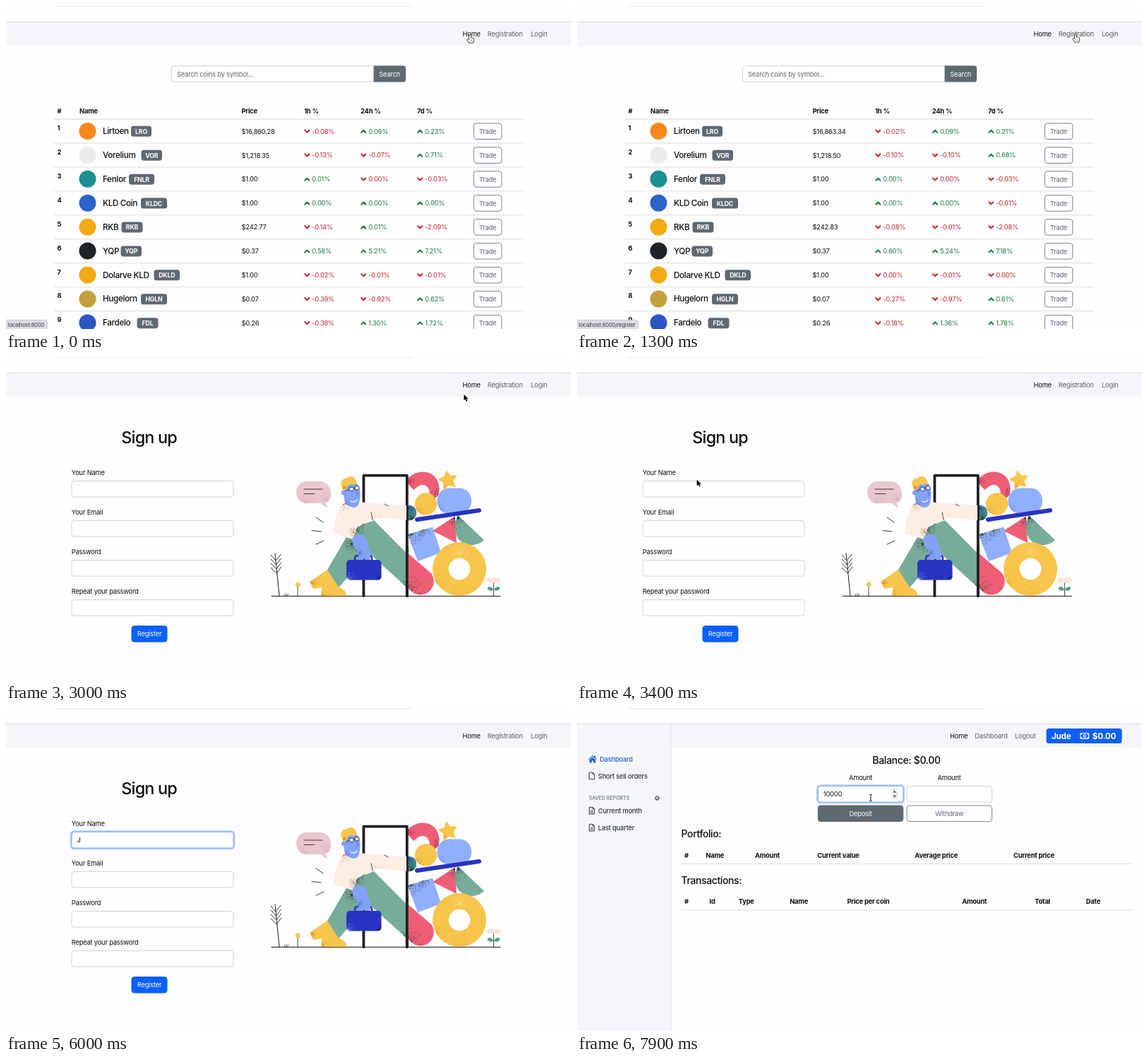
Recreate the animation shown at these times as an HTML page with a canvas. Size 800 by 457 pixels, loop 8 s.

```html
<!DOCTYPE html>
<html lang="en">
<head>
<meta charset="utf-8">
<title>Coin trading demo</title>
<style>
html, body { margin: 0; width: 100%; height: 100%; overflow: hidden; background: #fefdff; }
canvas { display: block; width: 800px; height: 457px; }
</style>
</head>
<body>
<canvas id="stage"></canvas>
<script>
const W = 800, H = 457, LOOP = 8000, STEP = 100;
const REM = 9.66;
const PAGE = '#fefdff', PANEL = '#f4f6f9', LINE = '#dcdfe3', EDGE = '#cfd3d9';
const INK = '#0e0f12', SLATE = '#606970', MUTED = '#5e6064', BLUE = '#0b5ffb';
const RED = '#c5222c', GREEN = '#177c42';

const dpr = window.devicePixelRatio || 1;
function prepare(canvas) {
  canvas.width = W * dpr;
  canvas.height = H * dpr;
  const c = canvas.getContext('2d');
  c.scale(dpr, dpr);
  return c;
}
const stage = document.getElementById('stage');
const g = prepare(stage);

// ---------- helpers ----------
function text(s, x, y, o = {}) {
  const size = (o.size || REM) * 0.97;
  g.font = `${o.weight || 400} ${size}px Inter, "Liberation Sans", sans-serif`;
  g.letterSpacing = `${size * (o.track ?? -0.023)}px`;
  g.textAlign = o.align || 'left';
  g.fillStyle = o.color || INK;
  g.fillText(s, x, y);
}
const bold = (s, x, y, o) => text(s, x, y, { weight: 700, ...o });
const mid = (s, x, y, o) => text(s, x, y, { align: 'center', ...o });

function rect(x, y, w, h, color) {
  g.fillStyle = color;
  g.fillRect(x, y, w, h);
}
function box(x, y, w, h, r, fill, stroke, lw = 1) {
  g.beginPath();
  g.roundRect(x, y, w, h, r);
  if (fill) { g.fillStyle = fill; g.fill(); }
  if (stroke) { g.strokeStyle = stroke; g.lineWidth = lw; g.stroke(); }
}
function disc(x, y, r, color) {
  g.beginPath();
  g.arc(x, y, r, 0, 7);
  g.fillStyle = color;
  g.fill();
}
function line(points, color, lw) {
  g.beginPath();
  points.forEach(([x, y], i) => i ? g.lineTo(x, y) : g.moveTo(x, y));
  g.strokeStyle = color;
  g.lineWidth = lw;
  g.stroke();
}
function field(x, y, w, focus) {
  if (focus) box(x - 2.3, y - 2.3, w + 4.6, 27.1, 5.5, '#b0cafd');
  box(x, y, w, 22.5, 3.6, '#fff', focus ? '#86aff8' : EDGE);
}
function button(label, x, y, w, fill, color) {
  box(x, y, w, 22.5, 3.6, fill, fill || '#7c848b');
  mid(label, x + w / 2, y + 14.9, { color });
}

// ---------- home page ----------
// name, ticker, logo colour, badge x, badge width, prices, changes (^ up, v down)
const COINS = [
  ['Lirtoen', 'LRO', '#f7891c', 177, 29, '16,860.28|16,863.34', 'v-0.08 ^0.09 ^0.23|v-0.02 ^0.09 ^0.21'],
  ['Vorelium', 'VOR', '#ebebee', 191.5, 29.5, '1,218.35|1,218.50', 'v-0.13 v-0.07 ^0.71|v-0.10 v-0.10 ^0.68'],
  ['Fenlor', 'FNLR', '#1b8f91', 174, 36, '1.00|1.00', '^0.01 v0.00 v-0.03|^0.00 v0.00 v-0.03'],
  ['KLD Coin', 'KLDC', '#2a63c9', 191, 37, '1.00|1.00', '^0.00 ^0.00 ^0.00|^0.00 ^0.00 v-0.01'],
  ['RKB', 'RKB', '#f2ab12', 163.5, 30, '242.77|242.83', 'v-0.14 ^0.01 v-2.09|v-0.08 v-0.01 v-2.08'],
  ['YQP', 'YQP', '#1f2226', 162.5, 29.5, '0.37|0.37', '^0.58 ^5.21 ^7.21|^0.60 ^5.24 ^7.18'],
  ['Dolarve KLD', 'DKLD', '#f2ab12', 209.5, 36.5, '1.00|1.00', 'v-0.02 v-0.01 v-0.01|v0.00 v-0.01 v0.00'],
  ['Hugelorn', 'HGLN', '#c3a03c', 191, 37, '0.07|0.07', 'v-0.39 v-0.92 ^0.62|v-0.27 v-0.97 ^0.61'],
  ['Fardelo', 'FDL', '#2d55c2', 185.5, 30, '0.26|0.26', 'v-0.38 ^1.30 ^1.72|v-0.18 ^1.36 ^1.78']
];

function change(code, x, y) {
  const up = code[0] === '^', color = up ? GREEN : RED, d = up ? -1 : 1;
  g.lineCap = g.lineJoin = 'round';
  line([[x + 1.2, y - 1.7 * d], [x + 4.3, y + 1.5 * d], [x + 7.4, y - 1.7 * d]], color, 2);
  g.lineCap = 'butt';
  g.lineJoin = 'miter';
  text(code.slice(1) + '%', x + 11.2, y + 3.2, { color });
}

function home(t) {
  const live = t >= 500 ? 1 : 0;
  const cols = [422, 502 + live * 0.7, 582];

  box(234.3, 84.8, 331.4, 22.4, 3.6, '#fff', EDGE);
  box(520.5, 84.5, 45.5, 23, [0, 3.6, 3.6, 0], SLATE);
  text('Search coins by symbol...', 242, 99.6, { color: '#5f666d' });
  mid('Search', 543.2, 99.6, { color: '#fff' });

  bold('#', 72.5, 151.5);
  bold('Name', 104, 151.5);
  bold('Price', 333.5, 151.5);
  ['1h %', '24h %', '7d %'].forEach((s, i) => bold(s, cols[i], 151.5));
  rect(68, 159.6, 664, 1, '#d5d8dc');

  COINS.forEach(([name, sym, color, bx, bw, price, moves], i) => {
    const y = 177 + 33.92 * i;
    bold(i + 1, 72.5, y - 1);
    disc(115.5, y, 12, color);
    text(name, 137, y + 4, { size: 12.08, weight: 500, track: -0.03 });
    box(bx, y - 7.2, bw, 15, 3.6, SLATE);
    mid(sym, bx + bw / 2, y + 3.8, { size: 9.06, weight: 700, color: '#fff' });
    text('$' + price.split('|')[live], 333.5, y + 3.6);
    moves.split('|')[live].split(' ').forEach((m, k) => change(m, cols[k], y + 0.3));
    button('Trade', 662.3, y - 11, 39.5, null, SLATE);
    rect(68, y + 16.5, 664, 1, LINE);
  });
}

function status(s, w) {
  box(-2, 444.3, w + 2, 16, [0, 3, 0, 0], '#dcdde1', '#c3c5c9', 0.8);
  text(s, 2.8, 453.8, { size: 7.85, color: '#3a3c40' });
}

// ---------- illustration ----------
let seed = 7;
function rnd() {
  seed = (seed * 16807) % 2147483647;
  return seed / 2147483647;
}
function makeArt() {
  const layer = document.createElement('canvas');
  const c = prepare(layer);
  const CREAM = '#fceee2', TEAL = '#77ac99', PINK = '#ee5f76', SKY = '#90b0fd', SKIN = '#82a2fa';
  const SUN = '#f8c54c', NAVY = '#2833c0', SOOT = '#1f2024';
  c.lineJoin = c.lineCap = 'round';

  // Fill a path and optionally spray fine speckles that thin out with distance.
  function shape(d, color, ...sprays) {
    const p = d instanceof Path2D ? d : new Path2D(d);
    c.fillStyle = color;
    c.fill(p);
    c.save();
    c.clip(p);
    for (const [x, y, r, ink = SOOT] of sprays) {
      c.fillStyle = ink;
      for (let i = 0; i < r * 18; i++) {
        const a = rnd() * 6.283, q = r * Math.pow(rnd(), 1.2);
        c.fillRect(x + q * Math.cos(a), y + q * Math.sin(a), 0.55, 0.55);
      }
    }
    c.restore();
  }
  function pen(d, color = SOOT, w = 1) {
    c.strokeStyle = color;
    c.lineWidth = w;
    c.stroke(new Path2D(d));
  }
  function ball(x, y, r) {
    const p = new Path2D();
    p.arc(x, y, r, 0, 7);
    return p;
  }
  function pill(x, y, w, h, r) {
    const p = new Path2D();
    p.roundRect(x, y, w, h, r);
    return p;
  }

  pen('M376 338.3H700', '#3b3b40', 1.2);

  // plants
  pen('M387 338L381 278');
  for (let i = 0; i < 4; i++) {
    const y = 280 + 6 * i;
    pen(`M375 ${y}L${381.8 + i * 0.5} ${y + 8}L389.5 ${y - 1}`, SOOT, 0.9);
  }
  pen('M394 335L395 338M397 334V338M400 335L398 338', SOOT, 0.7);
  pen('M413 323V338', SOOT, 0.8);
  shape(ball(413.3, 322, 3.4), SUN);
  pen('M690.5 319V338', SOOT, 0.8);
  shape(pill(680.5, 312.5, 20, 7, 3.5), '#f9e4d8');
  shape('M690 329C687 324 683 324 681.5 327C684 332 688 331 690 329Z', '#4f9a86');
  shape('M691 329C694 324 698 324 699.5 327C697 332 693 331 691 329Z', '#4f9a86');

  // speech bubble and motion marks
  shape('M426 176H444C464 176 464 206 452 206L455 213C451 212 448 209 446 207H426C406 207 406 176 426 176Z', '#e9c7cf', [424, 207, 14, '#cfa5af'], [453, 200, 10, '#d7adb7']);
  pen('M422 187H448M422 193.5H437', '#4d3238', 1.1);
  pen('M439 227L449 234M433 245.5L446 247M439 265L450 260', SOOT, 0.9);

  // stacked shapes
  shape('M569 172C583 157 607 160 612 178C615 187 614 196 607 200L599 197C602 188 596 180 589 181C583 182 580 186 577 188L569 179Z', PINK, [613, 196, 12], [572, 176, 6, '#b93550']);
  const star = new Path2D();
  for (let i = 0; i < 10; i++) {
    const a = -1.75 + i * Math.PI / 5, r = i % 2 ? 7.6 : 14.5;
    star.lineTo(626 + r * Math.cos(a), 174.3 + r * Math.sin(a));
  }
  star.closePath();
  shape(star, SUN, [618, 183, 6, '#d88a28']);
  shape(pill(610.5, 185.5, 48.5, 36, 17), SKY, [613, 216, 9, '#5a6fd0']);
  shape(ball(594.5, 208, 15.7), SUN, [583, 220, 11, '#c98520']);
  shape('M569 210C577 209 582 215 581 222C580 229 574 232 569 231Z', '#3f8586', [570, 214, 10, NAVY], [574, 229, 10]);
  pen('M582 230L670 217', NAVY, 6);
  shape('M569 251L604 240.5L616 277L583 289L569 252Z', SKY, [573, 250, 17], [590, 244, 10]);
  shape('M604 246L635.5 225.5L638 263Z', PINK, [635, 228, 13]);
  shape('M640 224L677 259C666 269 650 268 641 258C634 249 634 234 640 224Z', TEAL, [640, 227, 17]);
  const ring = ball(642, 300, 38);
  shape(ring, SUN, [640, 340, 20, '#dd9c33'], [609, 318, 14, '#e0a53a'], [642, 276, 12, '#fbe0a0']);
  shape(ball(642, 300, 15.3), PAGE);

  // door
  pen('M506.4 338V167.7H567.8V338', SOOT, 3.8);

  // legs: the front one changes colour beyond the door
  shape('M456 300L430 318L435 328L447 326L471 321Z', SUN, [434, 320, 6, '#d28b26']);
  shape('M455 304L448 322L446 338H482C483 331 476 328 471 325Z', SUN, [449, 337, 10, '#d59128']);
  shape('M489 243L512 280L471 326L455 301Z', TEAL, [489, 264, 13]);
  c.save();
  c.beginPath();
  c.rect(568, 250, 60, 90);
  c.clip();
  shape('M560 270L602 306A19 19 0 0 1 576 333L560 318Z', PINK, [570, 330, 22], [604, 333, 8, '#a92e48']);
  c.restore();
  shape('M490 243L521 231L566.5 277V325L497 262Z', TEAL, [496, 243, 11], [564, 322, 9, '#497f70']);
  pen('M567.8 268V338', SOOT, 3.8);

  // upper body, arm, head
  shape('M478 207C468 219 463 238 465 250L491 258L498 239L521 231L522 227L567 231V210L512 206L497 205Z', CREAM, [478, 208, 10, '#d4784e'], [492, 247, 7, '#b37b62'], [526, 229, 8, '#d8b79d']);
  pen('M517 220L519 230M536 208L541 211', SOOT, 0.8);
  shape('M477 186C477 177 486 174 494 177C502 181 503 194 500 206C498 213 493 214 488 212L480 207Z', SKIN, [481, 208, 7, '#4d61bf']);
  shape('M476 185C471 176 478 171 482 172C485 167 494 169 495 174C499 178 494 182 489 180C485 180 483 183 482 187L478 190Z', SUN, [479, 185, 4, '#c98320']);
  shape(ball(478.5, 192, 3.6), SKIN);
  shape(pill(486, 184.2, 6.2, 5.2, 2), '#dfe7fd');
  shape(pill(494, 182.6, 5.8, 5.2, 2), '#dfe7fd');
  pen('M481 190L486 187M487.5 184.2H490.7Q492.2 184.2 492.2 186V187.6Q492.2 189.4 490.7 189.4H487.5Q486 189.4 486 187.6V186Q486 184.2 487.5 184.2M492.2 186L494 185M495.5 182.6H498.5Q499.8 182.6 499.8 184V186.4Q499.8 187.8 498.5 187.8H495.5Q494 187.8 494 186.4V184Q494 182.6 495.5 182.6', SOOT, 0.8);
  pen('M496 189L499 194L496 196', '#4258b8', 0.8);
  pen('M488 204C492 206 495 205 497 202', '#fff', 1.2);

  // forearm and bag
  pen('M494 290V285Q494 281 498 281H514Q518 281 518 285V290', NAVY, 2.5);
  shape('M490 260C490 250 504 248 509 256L516 276L515 290H509L507 284L502 289L498 284L500 276L492 267Z', SKIN, [500, 277, 7, '#526ad0']);
  shape(pill(482, 287, 49.5, 28.5, 5), NAVY, [484, 313, 11, '#8f9cf8'], [529, 314, 8, '#151b77']);
  return layer;
}
const art = makeArt();

// ---------- sign-up page ----------
function signup(t) {
  const focus = t >= 4300;
  text('Sign up', 163.3, 121.8, { size: 24.15, weight: 500, track: -0.035 });
  ['Your Name', 'Your Email', 'Password', 'Repeat your password'].forEach((s, i) => {
    const y = 56 * i;
    text(s, 92.8, 166.8 + y);
    field(93, 175.5 + y, 229, focus && i === 0);
  });
  if (t >= 5500) text('J', 100.5, 190.2);
  button('Register', 178, 380.5, 50, BLUE, '#fff');
  g.drawImage(art, 0, 0, W, H);
}

// ---------- dashboard ----------
function fileIcon(x, y, lined) {
  line([[x + 5, y], [x, y], [x, y + 9.6], [x + 7.4, y + 9.6], [x + 7.4, y + 2.6], [x + 5, y], [x + 5, y + 2.6], [x + 7.4, y + 2.6]], '#303338', 1);
  if (lined) [4.6, 6.2, 7.8].forEach(d => line([[x + 1.6, y + d], [x + 5.8, y + d]], '#303338', 0.7));
}
function heads(list, y) {
  for (const [s, x] of list) bold(s, x, y);
  rect(148, y + 8, 638, 1, LINE);
}

function dashboard(t) {
  rect(0, 56, 133, 401, PANEL);
  rect(132.5, 23, 1, 434, '#dfe1e4');

  const link = '#1c5cc9';
  g.fillStyle = link;
  g.fill(new Path2D('M16 72.4L22 67L24.5 69.2V67.6H26V70.6L28 72.4L27.2 73.2L22 68.6L16.8 73.2ZM17.8 73.5L22 69.8L26.2 73.5V77.6H23.2V74.4H20.8V77.6H17.8Z'));
  text('Dashboard', 32, 76.2, { weight: 500, color: link });
  fileIcon(17.3, 91.2);
  text('Short sell orders', 29.8, 100.3, { weight: 500, color: '#303338' });
  text('SAVED REPORTS', 16.8, 130, { size: 7.25, weight: 500, track: 0, color: '#6c7278' });
  g.setLineDash([1.4, 1.1]);
  g.beginPath();
  g.arc(113.5, 127.5, 3.2, 0, 7);
  g.strokeStyle = '#55595e';
  g.lineWidth = 1;
  g.stroke();
  g.setLineDash([]);
  g.beginPath();
  g.arc(113.5, 127.5, 2, 0, 7);
  g.lineWidth = 1.2;
  g.stroke();
  fileIcon(17.3, 140.4, true);
  text('Current month', 29.8, 149.4, { weight: 500, color: '#303338' });
  fileIcon(17.3, 164.4, true);
  text('Last quarter', 29.8, 173.2, { weight: 500, color: '#303338' });

  box(664.5, 29, 107, 21, 3.6, BLUE);
  bold('Jude', 672, 44, { size: 12.08, color: '#fff' });
  bold('$0.00', 729.8, 44, { size: 12.08, color: '#fff' });
  box(712.8, 35.8, 11.8, 7.6, 0.8, null, '#fff', 1.1);
  g.beginPath();
  g.ellipse(718.7, 39.6, 1.7, 2, 0, 0, 7);
  g.stroke();
  for (const [x, y] of [[714, 37], [723.4, 37], [714, 42.2], [723.4, 42.2]]) disc(x, y, 1.1, '#fff');

  mid('Balance: $0.00', 466.5, 79.3, { size: 14.5, weight: 500, track: -0.025 });
  mid('Amount', 401.5, 102.4);
  mid('Amount', 527, 102.4);
  const focus = t >= 7200;
  field(341.3, 110.5, 120.5, focus);
  field(467, 110.5, 120.5, false);
  if (focus) {
    box(445, 114, 9.5, 15, 2, '#ebebee');
    g.fillStyle = '#44474b';
    g.fill(new Path2D('M447.4 119.4L449.7 116.8L452 119.4ZM447.4 123.8L449.7 126.4L452 123.8Z'));
  }
  const typed = t < 7500 ? 0 : t < 7700 ? 1 : t < 7800 ? 2 : t < 7900 ? 4 : 5;
  text('10000'.slice(0, typed), 348.8, 125.3);
  button('Deposit', 341.3, 138, 120.5, SLATE, '#fff');
  button('Withdraw', 467, 138, 120.5, null, SLATE);

  text('Portfolio:', 147.6, 183.2, { size: 14.5, weight: 500, track: -0.03 });
  heads([['#', 152], ['Name', 182.3], ['Amount', 252], ['Current value', 340.3], ['Average price', 478.3], ['Current price', 618]], 212);
  text('Transactions:', 147.6, 248.8, { size: 14.5, weight: 500, track: -0.03 });
  heads([['#', 152], ['Id', 187.5], ['Type', 228.8], ['Name', 301.2], ['Price per coin', 382.5], ['Amount', 545.2], ['Total', 648.3], ['Date', 720.8]], 277.4);
}

// ---------- pointer ----------
const POINTERS = {
  arrow: 'M0 0V8.6L2 6.8L3.4 10L5 9.3L3.6 6.2H6.2Z',
  hand: 'M-1.2 6.6V0.8C-1.2 -0.4 0.8 -0.4 0.8 0.8V4L4 4.7C5 5 5.3 5.7 5.2 6.6L4.5 10.8H-1L-3.7 7.4C-4.1 6.4 -3.2 5.7 -2.4 6Z'
};
// time, x, y
const PATH = [
  [0, 657, 41], [500, 657, 41], [900, 706, 40], [1900, 706, 40], [2400, 704, 39], [2900, 704, 39],
  [3400, 169.7, 173.6], [3700, 169.7, 173.6], [4200, 119.5, 183], [5500, 119.5, 183],
  [6900, 440, 239], [7200, 416, 127], [LOOP, 416, 127]
];
function place(t) {
  const i = PATH.findIndex(k => k[0] > t);
  const [t0, x0, y0] = PATH[i - 1], [t1, x1, y1] = PATH[i];
  const u = (t - t0) / (t1 - t0), e = u * u * (3 - 2 * u);
  return [x0 + (x1 - x0) * e, y0 + (y1 - y0) * e];
}
function pointer(t, x, y) {
  if (t >= 5500 && t < 6900) return;
  g.save();
  g.translate(x, y);
  if ((t >= 4200 && t < 5500) || t >= 7200) {
    const d = new Path2D('M-1.8 -5Q0 -5 0 -3.8Q0 -5 1.8 -5M0 -4V4M-1.8 5Q0 5 0 3.8Q0 5 1.8 5');
    g.strokeStyle = '#fff';
    g.lineWidth = 2;
    g.stroke(d);
    g.strokeStyle = '#111';
    g.lineWidth = 1;
    g.stroke(d);
  } else {
    const hand = t < 2900, d = new Path2D(hand ? POINTERS.hand : POINTERS.arrow);
    g.lineJoin = 'round';
    g.strokeStyle = hand ? '#111' : '#fff';
    g.fillStyle = hand ? '#fff' : '#000';
    g.lineWidth = 1.5;
    g.stroke(d);
    g.fill(d);
    if (hand) [0.6, 2.6].forEach(k => line([[k, 7], [k, 9.4]], '#444', 0.6));
  }
  g.restore();
}

// ---------- frame ----------
function draw(t) {
  const page = t < 2900 ? home : t < 6200 ? signup : dashboard;
  const [x, y] = place(t);
  rect(0, 0, W, H, PAGE);
  rect(72, 0, 503, 0.8, '#e4e4e7');
  rect(0, 23, W, 33, PANEL);
  rect(0, 22, W, 1, '#d9dadd');

  page(t);
  if (page === dashboard) {
    text('Home', 528, 43.2);
    text('Dashboard', 563.2, 43.2, { color: MUTED });
    text('Logout', 620, 43.2, { color: MUTED });
  } else {
    const over = page === home && x > 682;
    text('Home', 646.5, 43.2);
    text('Registration', 681.8, 43.2, { color: over ? '#505255' : MUTED });
    text('Login', 743, 43.2, { color: MUTED });
    if (over) status('localhost:8000/register', 86.5);
    else if (page === home && x < 673) status('localhost:8000', 58.5);
  }
  pointer(t, x, y);
}
function tick() {
  const t = performance.now() % LOOP;
  draw(Math.floor(t / STEP) * STEP);
  requestAnimationFrame(tick);
}
tick();
</script>
</body>
</html>
```
